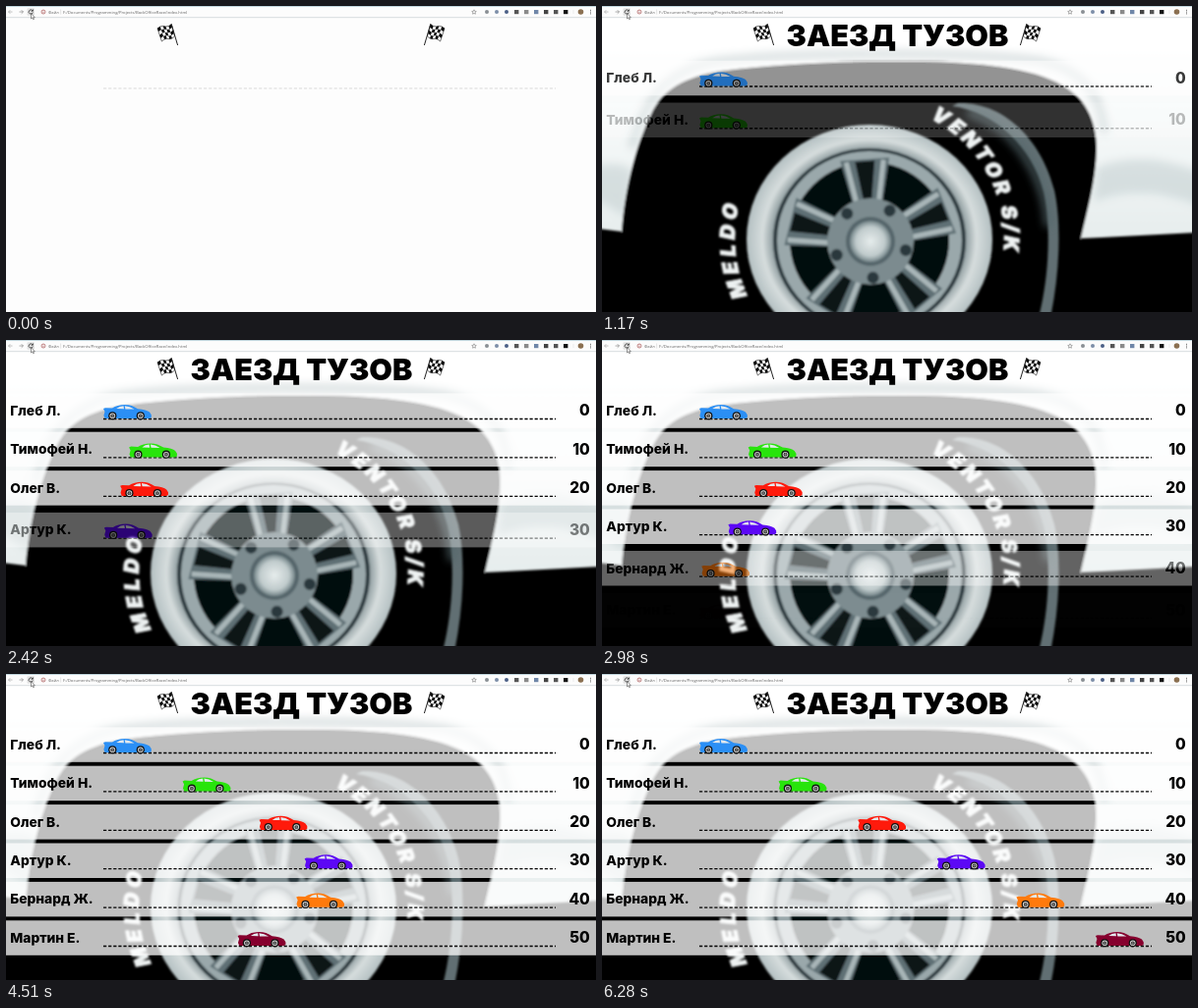
An HTML page that plays this animation: 600 px wide and 312 px high, repeating every 6750 ms.

```html
<!DOCTYPE html>
<html lang="ru">
<head>
<meta charset="utf-8">
<title>Заезд</title>
<style>
  html, body { margin: 0; width: 100%; height: 100%; overflow: hidden; background: #fdfdfd; }
  svg { display: block; width: 100%; height: 100%; }
  text { font-family: Inter, "Open Sans", sans-serif; }
  .title { font-size: 30.5px; font-weight: 900; text-anchor: middle; }
  .name { font-size: 13.8px; font-weight: 800; }
  .score { font-size: 15.5px; font-weight: 800; text-anchor: end; }
  .tire { font-size: 21px; font-weight: 900; font-style: italic; fill: #eef2f2; stroke: #eef2f2; }
  .bar { font: 4.2px "Open Sans", sans-serif; fill: #666; }
</style>
</head>
<body>
<svg viewBox="0 0 600 312">
  <defs>
    <filter id="soft" x="-10%" y="-10%" width="120%" height="120%"><feGaussianBlur stdDeviation="1.3"/></filter>
    <filter id="haze" x="-30%" y="-30%" width="160%" height="160%"><feGaussianBlur stdDeviation="4"/></filter>
    <linearGradient id="panel" x1="0" y1="0" x2="0" y2="1">
      <stop offset=".15" stop-color="#fff"/>
      <stop offset=".5" stop-color="#f6f9f9"/>
      <stop offset="1" stop-color="#e6eded"/>
    </linearGradient>
    <radialGradient id="rim">
      <stop offset=".78" stop-color="#8e9c9f"/>
      <stop offset=".87" stop-color="#d6dddd"/>
      <stop offset="1" stop-color="#b4c0c2"/>
    </radialGradient>
    <radialGradient id="hub">
      <stop offset="0" stop-color="#e6ecec"/>
      <stop offset=".7" stop-color="#c0cbcc"/>
      <stop offset="1" stop-color="#75868a"/>
    </radialGradient>
    <clipPath id="page"><rect y="12" width="600" height="300"/></clipPath>
    <path id="ring" d="M272 374A137 137 0 0 1 272 100A137 137 0 0 1 272 374"/>
    <g id="flag"></g>
  </defs>

  <rect width="600" height="312" fill="#fdfdfd"/>
  <g id="scene">
    <g id="photo" clip-path="url(#page)"></g>
    <text class="title" x="300.5" y="41">ЗАЕЗД ТУЗОВ</text>
  </g>
  <path id="preline" d="M99 84H559" stroke="#d9d9d9" stroke-dasharray="3.2 1.9"/>
  <use href="#flag"/>
  <use href="#flag" transform="matrix(-1 0 0 1 600 0)"/>
  <g id="rows"></g>
  <g id="toolbar"></g>
</svg>
<script>
const LOOP = 6750, SCENE_AT = 60;
const FADE_AT = 400, FADE = 1000, DRIVE_AT = 765, DRIVE = 2960, STAGGER = 515;
const PITCH = 39.4, STEP = 80.6, RISE = 6.5;
const racers = [
  ["Глеб Л.", "#2b8ff5"], ["Тимофей Н.", "#28e40c"], ["Олег В.", "#ff1a0c"],
  ["Артур К.", "#5c08f5"], ["Бернард Ж.", "#ff7a0c"], ["Мартин Е.", "#86002e"]
];

const $ = id => document.getElementById(id);
const clamp = v => Math.max(0, Math.min(1, v));
const swing = p => 0.5 - Math.cos(Math.PI * p) / 2;
const range = n => [...Array(n).keys()];

// Checkered flag: a slightly waving grid leaning on a pole
function drawFlag() {
  const cols = 5, rows = 4;
  const at = (c, r) => {
    const u = c / cols, v = r / rows;
    const x = 168.3 - 14.3 * u + (3.2 + 1.2 * u) * v;
    const y = 18.6 + 4.2 * u + (12.4 + 0.8 * u) * v + Math.sin(u * 6.3) * 1.1;
    return x.toFixed(2) + " " + y.toFixed(2);
  };
  let d = "";
  for (let c = 0; c < cols; c++)
    for (let r = 0; r < rows; r++)
      if ((c + r) % 2 === 0)
        d += `M${at(c, r)}L${at(c + 1, r)}L${at(c + 1, r + 1)}L${at(c, r + 1)}Z`;
  const edge = [...range(6).map(c => at(c, 0)), ...range(6).map(c => at(5 - c, 4))];
  $("flag").innerHTML =
    `<path d="M${edge.join("L")}Z" fill="#fff" stroke="#111" stroke-width=".6"/>
     <path d="${d}" fill="#0a0a0a"/>
     <path d="M168.2 18.4L174.6 40" stroke="#222" stroke-width="1"/>`;
}

function drawPhoto() {
  const arch = "M20 230C23 190 33 145 50 110C62 84 84 72 120 66C190 57 250 56 310 56" +
    "C370 56 430 61 462 77C492 92 503 116 503 146C502 180 493 210 487 237";
  const spokes = range(5).map(k => `<g transform="rotate(${72 * k - 4})">
      <path d="M-9 -12L-25 -84H25L9 -12Z" fill="#5f7075"/>
      <path d="M-3 -34L-10 -82H10L3 -34Z" fill="#0c1417"/>
      <path d="M-7 -16L-19 -82M7 -16L19 -82" stroke="#a9b6b8" stroke-width="5"/></g>`).join("");
  const bolts = range(5).map(k =>
    `<circle cy="-37" r="6" transform="rotate(${72 * k + 32})" fill="#2a383c"/>`).join("");
  $("photo").innerHTML = `
    <rect y="12" width="600" height="300" fill="#000"/>
    <g filter="url(#soft)">
      <path d="M-5 5H605V231L487 237L20 230L-5 227Z" fill="url(#panel)"/>
      <g fill="#b9c6c8" opacity=".45" filter="url(#haze)">
        <path d="M502 165Q550 145 610 170V205Q550 180 500 200Z"/>
        <path d="M-10 165Q15 155 32 168L24 215L-10 195Z"/>
      </g>
      <path d="M30 145C44 92 70 62 120 56C190 47 370 46 445 56C490 64 508 92 511 130" fill="none"
        stroke="#a9b8ba" stroke-width="7" opacity=".5" filter="url(#haze)"/>
      <path d="${arch}L487 250H20Z" fill="#000"/>
    </g>
    <path d="M356 102C400 108 438 145 449 190C456 220 456 270 444 318H456C466 270 467 220 460 188C448 140 412 98 362 99Z"
      fill="#82959a" opacity=".75" filter="url(#soft)"/>
    <path d="M372 108C425 125 452 180 454 225" fill="none"
      stroke="#53666b" stroke-width="9" opacity=".7" filter="url(#haze)"/>
    <g filter="url(#soft)">
      <ellipse cx="272" cy="238" rx="125" ry="117" fill="url(#rim)"/>
      <ellipse cx="272" cy="239" rx="98" ry="94" fill="#2a383c"/>
      <ellipse cx="272" cy="239" rx="94" ry="91" fill="#9aa8ab"/>
      <ellipse cx="272" cy="239" rx="81" ry="80" fill="#050809"/>
      <g transform="translate(273 240)">${spokes}
        <circle r="44" fill="#7c8b8f"/>${bolts}
        <circle r="25" fill="#54656a"/><circle r="21" fill="url(#hub)"/></g>
      <text class="tire" letter-spacing="4.5"><textPath href="#ring" startOffset="155">MELDO</textPath></text>
      <text class="tire" letter-spacing="3.5"><textPath href="#ring" startOffset="494">VENTOR S/K</textPath></text>
    </g>`;
}

const wheel = x => `<circle cx="${x}" cy="11.3" r="4.1" fill="#111"/>
  <circle cx="${x}" cy="11.3" r="2.8" fill="#ddd"/><circle cx="${x}" cy="11.3" r="1.9" fill="#222"/>
  <path d="M${x - 1.7} 11.3h3.4M${x} 9.6v3.4" stroke="#bbb" stroke-width=".5"/>`;

const car = color => `<g class="car">
  <path d="M0 4L2 3.2L9 3.5Q14 .3 22 0Q29 .1 35 4.2Q44 5.2 47 7.6L48.8 10.3V13L47 14.1H1.6L.4 11L1.5 7Z" fill="${color}"/>
  <path d="M13.2 4.1Q16.5 1.4 20.5 1.2L21 4.3ZM21.8 1.2Q27 1.3 31.5 4.6L22.4 4.4Z" fill="#e3e9ee"/>
  ${wheel(9.3)}${wheel(37.8)}</g>`;

function drawRows() {
  $("rows").innerHTML = racers.map(([name, color], i) => `<g>
    <rect y="54.3" width="600" height="35.5" fill="#fff" fill-opacity=".75"/>
    <text class="name" x="4.3" y="76.9">${name}</text>
    <path d="M99 80.5H559" stroke="#000" stroke-width="1.3" stroke-dasharray="3.2 1.9"/>
    ${car(color)}
    <text class="score" x="593.8" y="77.2">${i * 10}</text></g>`).join("");
}

function drawToolbar() {
  const tones = ["#8a8f94", "#7d8ea8", "#4b5f86", "#555", "#8a8a8a", "#6f86a8", "#444", "#555", "#111"];
  const marks = tones.map((c, i) => i < 3
    ? `<circle cx="${489 + 10 * i}" cy="6" r="2" fill="${c}"/>`
    : `<rect x="${487 + 10 * i}" y="4" width="4.4" height="4.2" fill="${c}"/>`).join("");
  $("toolbar").innerHTML = `
    <rect width="600" height="12" fill="#fcfcfc"/>
    <path d="M0 .4H600" stroke="#b9d3dc" stroke-width=".9"/>
    <path d="M0 11.7H600" stroke="#cdd3d6" stroke-width=".8"/>
    <g fill="none" stroke="#aaa" stroke-width=".7">
      <path d="M6.5 6H2.5M4.3 4.2L2.5 6L4.3 7.8"/>
      <path d="M13.5 6H17.5M15.7 4.2L17.5 6L15.7 7.8" stroke="#888"/>
      <rect x="21.5" y="2.3" width="7.5" height="7.5" rx="1" fill="#e2e2e2" stroke="none"/>
      <path d="M27 4.8A2.1 2.1 0 1 0 27.3 6.6M27.4 3.5V5.2H25.6" stroke="#444" stroke-width=".9"/>
      <circle cx="38" cy="6" r="2" stroke="#a55"/><path d="M38 5.6V7.2M38 4.6V5" stroke="#a55"/>
      <path d="M55.6 3.5V8.5" stroke="#ccc" stroke-width=".5"/>
      <path d="M476 3.8L476.7 5.3L478.3 5.5L477.1 6.6L477.4 8.2L476 7.4L474.6 8.2L474.9 6.6L473.7 5.5L475.3 5.3Z" stroke="#777" stroke-width=".6"/>
    </g>
    <text class="bar" x="43" y="7.5">Файл</text>
    <text class="bar" x="58" y="7.5">F:/Documents/Programming/Projects/BackOfficeRace/index.html</text>
    ${marks}
    <path d="M577 4V8" stroke="#ddd" stroke-width=".5"/>
    <circle cx="584.5" cy="6" r="2.8" fill="#8a6f50"/>
    <path d="M594.5 3.8v1M594.5 5.6v1M594.5 7.4v1" stroke="#666"/>
    <path d="M25.5 7.6V13L26.8 11.9L27.7 13.8L28.5 13.4L27.6 11.6H29.3Z" fill="#fff" stroke="#333" stroke-width=".5"/>`;
}

drawFlag();
drawPhoto();
drawRows();
drawToolbar();
const rowNodes = [...$("rows").children];
const carNodes = rowNodes.map(g => g.querySelector(".car"));

function render(t) {
  const ready = t >= SCENE_AT;
  $("scene").style.display = ready ? "" : "none";
  $("preline").style.display = ready ? "none" : "";
  rowNodes.forEach((row, i) => {
    const shown = clamp((t - FADE_AT - STAGGER * i) / FADE);
    const driven = swing(clamp((t - DRIVE_AT - STAGGER * i) / DRIVE));
    row.setAttribute("opacity", shown);
    row.setAttribute("transform", `translate(0 ${PITCH * i + RISE * (1 - shown)})`);
    carNodes[i].setAttribute("transform", `translate(${99 + STEP * i * driven} 66)`);
  });
}

const start = performance.now();
function tick() {
  render((performance.now() - start) % LOOP);
  requestAnimationFrame(tick);
}
tick();
</script>
</body>
</html>
```
